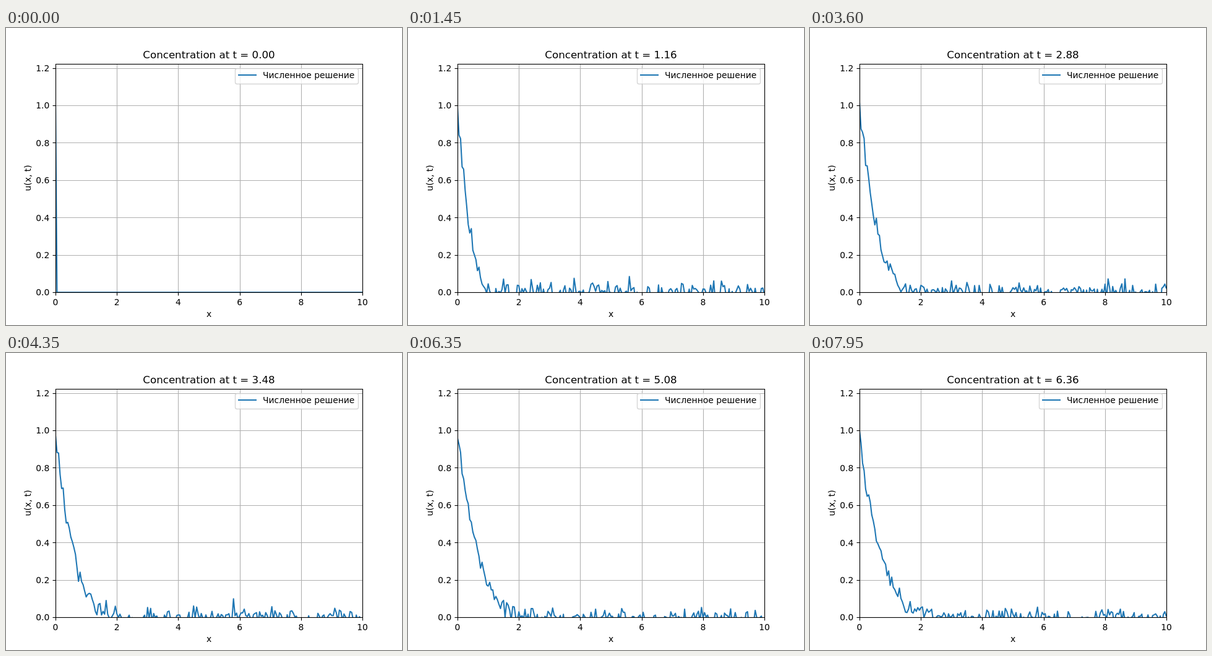
An HTML page with a canvas for the animation above (8 s loop, 640 px wide and 480 px high).

```html
<!DOCTYPE html>
<html lang="ru">
<head>
<meta charset="utf-8">
<style>
  html, body { margin: 0; width: 100%; height: 100%; overflow: hidden; background: #fff; }
  canvas { display: block; }
</style>
</head>
<body>
<canvas id="plot" width="640" height="480"></canvas>
<script>
const ctx = document.getElementById('plot').getContext('2d');
const LEFT = 80, RIGHT = 576, TOP = 57.6, BOTTOM = 427.2;
const STEP_MS = 50, STEPS = 160, DT = 0.04;
const POINTS = 201, DX = 0.05;
const DIFFUSION = 0.08, DECAY = 0.14;
const BLUE = '#1f77b4', THIN = 1.11;

const px = x => LEFT + x * 49.6;
const py = u => BOTTOM - u * 302.2;
const snap = v => Math.round(v) + 0.5;

function line(x1, y1, x2, y2, color, width) {
  ctx.strokeStyle = color;
  ctx.lineWidth = width;
  ctx.beginPath();
  ctx.moveTo(x1, y1);
  ctx.lineTo(x2, y2);
  ctx.stroke();
}

function label(text, x, y, align = 'center', size = 13.89) {
  ctx.font = `${size}px "DejaVu Sans", sans-serif`;
  ctx.textAlign = align;
  ctx.fillStyle = '#000';
  ctx.fillText(text, x, y);
}

// Seeded normal random numbers
function gaussian(seed) {
  let state = Math.imul(seed + 1, 0x9e3779b1);
  const uniform = () => {
    state = (state + 0x6d2b79f5) | 0;
    let h = Math.imul(state ^ (state >>> 15), state | 1);
    h ^= h + Math.imul(h ^ (h >>> 7), h | 61);
    return ((h ^ (h >>> 14)) >>> 0) / 4294967296;
  };
  return () => Math.sqrt(-2 * Math.log(1 - uniform())) * Math.cos(2 * Math.PI * uniform());
}

function erfc(z) {
  if (z < 0) return 2 - erfc(-z);
  const k = 1 / (1 + 0.3275911 * z);
  return k * (0.254829592 + k * (-0.284496736 + k * (1.421413741 +
    k * (-1.453152027 + k * 1.061405429)))) * Math.exp(-z * z);
}

// Diffusion with decay from a boundary held at 1
function concentration(x, t) {
  if (t === 0) return x === 0 ? 1 : 0;
  const z = x / (2 * Math.sqrt(DIFFUSION * t));
  const r = Math.sqrt(DECAY * t);
  const e = Math.exp(-x * Math.sqrt(DECAY / DIFFUSION));
  return (e * erfc(z - r) + erfc(z + r) / e) / 2;
}

function drawCurve(step) {
  const t = step * DT;
  const noise = gaussian(step);
  const amount = step ? 0.03 * Math.exp(-t / 25) : 0;
  ctx.save();
  ctx.beginPath();
  ctx.rect(LEFT, 58, RIGHT - LEFT, 370);
  ctx.clip();
  ctx.strokeStyle = BLUE;
  ctx.lineWidth = 2.08;
  ctx.lineJoin = 'round';
  ctx.beginPath();
  for (let i = 0; i < POINTS; i++) {
    const x = i * DX;
    ctx.lineTo(px(x), py(concentration(x, t) + amount * noise()));
  }
  ctx.stroke();
  ctx.restore();
}

function drawAxes() {
  for (let x = 0; x <= 10; x += 2) {
    const at = snap(px(x));
    line(at, 428, at, 432.5, '#000', THIN);
    label(x, px(x), 448);
  }
  for (let i = 0; i <= 6; i++) {
    const at = snap(py(i / 5));
    line(75.5, at, 80, at, '#000', THIN);
    label((i / 5).toFixed(1), 70.3, Math.round(py(i / 5) + 5.2), 'right');
  }
  ctx.strokeStyle = '#000';
  ctx.lineWidth = THIN;
  ctx.strokeRect(80.5, 58.5, 496, 369);
  label('x', 328, 467);
  ctx.save();
  ctx.translate(40, 242.4);
  ctx.rotate(-Math.PI / 2);
  label('u(x, t)', 0, 0);
  ctx.restore();
}

function drawGrid() {
  for (let x = 0; x <= 10; x += 2) line(snap(px(x)), 58, snap(px(x)), 427, '#b0b0b0', THIN);
  for (let i = 0; i <= 6; i++) {
    const at = snap(py(i / 5));
    line(LEFT, at, RIGHT, at, '#b0b0b0', THIN);
  }
}

function drawLegend() {
  ctx.beginPath();
  ctx.roundRect(370.5, 65.5, 199, 25, 2.8);
  ctx.fillStyle = 'rgba(255,255,255,0.8)';
  ctx.fill();
  ctx.strokeStyle = 'rgba(204,204,204,0.8)';
  ctx.lineWidth = 1.39;
  ctx.stroke();
  line(375, 76, 405, 76, BLUE, 2.08);
  label('Численное решение', 415, 81, 'left');
}

function draw(step) {
  ctx.fillStyle = '#fff';
  ctx.fillRect(0, 0, 640, 480);
  drawGrid();
  drawCurve(step);
  drawAxes();
  label(`Concentration at t = ${(step * DT).toFixed(2)}`, 328, 49, 'center', 16.67);
  drawLegend();
}

const start = performance.now();
let shown = -1;
function tick() {
  const step = Math.floor((performance.now() - start) / STEP_MS) % STEPS;
  if (step !== shown) draw(shown = step);
  requestAnimationFrame(tick);
}
tick();
</script>
</body>
</html>
```
